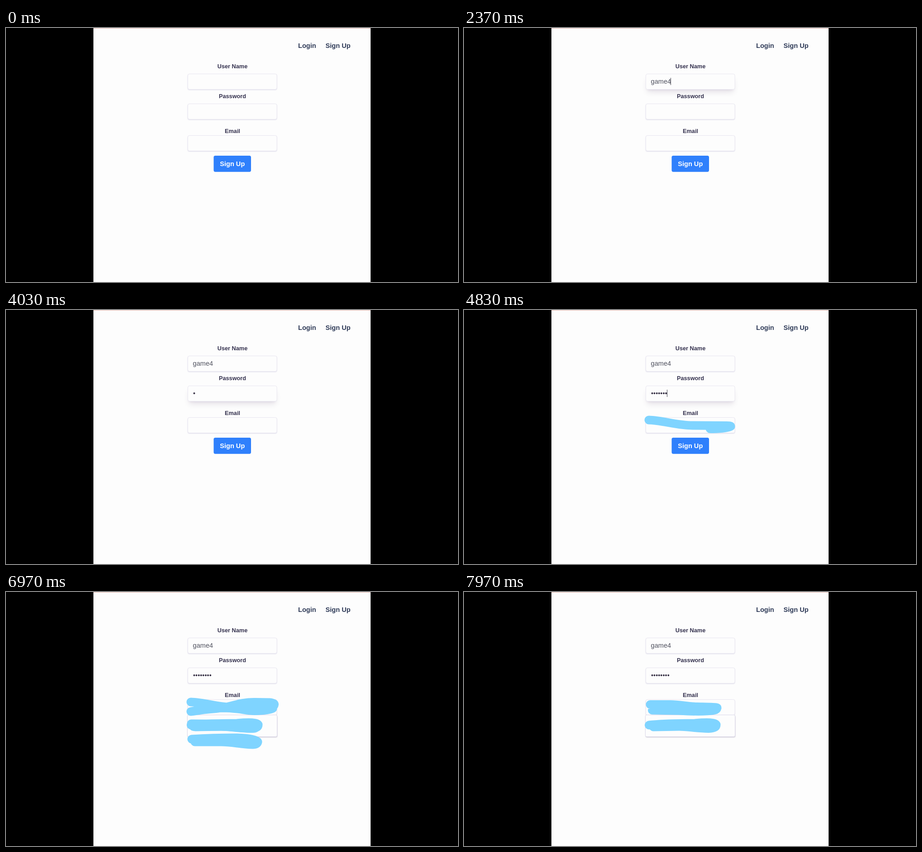
An HTML page that plays this animation: 998x561 px, repeating every 8000 ms.

```html
<!DOCTYPE html>
<html lang="en">
<head>
<meta charset="utf-8">
<title>Sign up form</title>
<style>
  html, body { margin: 0; width: 100%; height: 100%; overflow: hidden; background: #000; }
  svg { display: block; width: 998px; height: 561px; }
  text { font-family: "Liberation Sans", Arial, sans-serif; font-size: 14.56px; white-space: pre; }
  .nav { font-weight: 700; fill: #2e3a57; }
  .label { font-weight: 700; font-size: 12.74px; fill: #35324f; text-anchor: middle; }
  .value { fill: #50525f; }
  .dots { fill: #3a3448; }
  .ink { fill: none; stroke: #7fd4ff; stroke-width: 19; stroke-linecap: round; stroke-linejoin: round; }
</style>
</head>
<body>
<svg id="stage" viewBox="0 0 998 561">
  <defs>
    <filter id="blur1" x="-10%" y="-100%" width="120%" height="300%"><feGaussianBlur stdDeviation="1.1"/></filter>
    <filter id="blur3" x="-10%" y="-100%" width="120%" height="300%"><feGaussianBlur stdDeviation="2.7"/></filter>
    <filter id="blur7" x="-20%" y="-100%" width="140%" height="300%"><feGaussianBlur stdDeviation="6.5"/></filter>
  </defs>
  <rect width="998" height="561" fill="#000"/>
  <rect x="193" width="612" height="561" fill="#fdfdfd"/>
  <rect x="193" width="612" height="1" fill="#eab9b0"/>
  <text class="nav" x="645" y="44">Login</text>
  <text class="nav" x="705.6" y="44">Sign Up</text>
  <g id="fields"></g>
  <text class="label" x="500" y="89">User Name</text>
  <text class="label" x="500" y="155.3">Password</text>
  <text class="label" x="500" y="232">Email</text>
  <rect x="458.5" y="282" width="82.5" height="35.7" rx="3.6" fill="#2f80fc"/>
  <text x="499.8" y="305" fill="#fff" font-weight="700" text-anchor="middle">Sign Up</text>
  <text id="user" class="value" x="412.6" y="122.8"></text>
  <text id="pass" class="dots" x="413" y="189.2"></text>
  <rect id="caret" width="1" height="16" fill="#44444f"/>
  <g id="menu">
    <rect id="menuShadow" x="401" y="273" width="198" fill="#3c2a5c" opacity=".28" rx="3" filter="url(#blur1)"/>
    <rect id="menuBox" x="400.5" y="271.5" width="198" fill="#fdfdfd" stroke="#dcd9ea" rx="3"/>
  </g>
  <g id="inks"></g>
</svg>
<script>
const LOOP = 8000, BLINK = 333;
const NAME = "game4";
const NAME_KEYS = [1900, 1970, 2050, 2130, 2200];
const PASS_KEYS = [3690, 4100, 4180, 4260, 4350, 4720, 4800, 4880];
const USER_FOCUS = 1330, PASS_FOCUS = 3200, MAIL_FOCUS = 5050;
const MENU_OPEN = 5150, MENU_SHRINK = 5700;

const $ = id => document.getElementById(id);
const ramp = (t, from, length) => Math.min(1, Math.max(0, (t - from) / length));

function add(parent, tag, attrs) {
  const el = document.createElementNS("http://www.w3.org/2000/svg", tag);
  for (const key in attrs) el.setAttribute(key, attrs[key]);
  parent.append(el);
  return el;
}

function addField(y) {
  const group = add($("fields"), "g", {});
  const box = (inset, dy, attrs) => add(group, "rect", {
    x: 401.5 + inset, y: y + dy + inset, width: 196.5 - 2 * inset, height: 34 - 2 * inset, rx: 3.6, ...attrs
  });
  const rest = box(0, 1, { fill: "#3a2f80", opacity: 0.22, filter: "url(#blur1)" });
  const wide = box(3, 9, { fill: "#3c1e50", filter: "url(#blur7)" });
  const near = box(2, 4, { fill: "#3c1e50", filter: "url(#blur3)" });
  box(0, 0, { fill: "#fdfdfd", stroke: "#e9e7f1" });
  return focus => {
    rest.setAttribute("opacity", 0.22 * (1 - focus));
    wide.setAttribute("opacity", 0.12 * focus);
    near.setAttribute("opacity", 0.06 * focus);
  };
}

const setUser = addField(101.5);
const setPass = addField(167.5);
addField(237.5)(0);

// Marker strokes: start of drawing, start of fading, path
const strokes = [
  [4710, 7200, "M408 243C440 244 470 255 505 255L580 255.5Q589 255.5 589 257Q580 262 549 262.5C530 262 510 256 480 256C445 257 430 262 408 264C440 258 465 259 487 254C515 247 530 243 550 243.5L582 244Q592 245 592.5 248Q592 254 580 255"],
  [5000, 7450, "M409 291C432 291 455 291 475 291.5C500 292 510 294 525 294Q552 295 552.5 298Q551 301.5 545 301.5C520 301 500 297 475 297L414 297.5"],
  [5050, 7450, "M410 325C440 323 480 322 510 322Q553 324 556 331Q555 337 545 337C515 336 500 331 475 331L417 331"],
  [6600, 9000, "M408.5 294C440 290 480 290.5 510 290Q553 286 557 293Q557 301 540 301.5C510 301 495 297 475 297L418 298"],
  [7240, 9000, "M411 248.5L455 248.5C480 249 490 253 515 253.5C535 254 559 254 559 256Q558 260 553 261C535 264.5 500 263.5 475 262L415.5 261"]
].map(([start, end, d]) => {
  const path = add($("inks"), "path", { class: "ink", d });
  return { path, start, end, length: path.getTotalLength() };
});

const typed = (keys, t) => keys.filter(k => k <= t).length;

function drawCaret(t) {
  const inPass = t >= PASS_FOCUS;
  const field = inPass ? $("pass") : $("user");
  const events = [USER_FOCUS, ...NAME_KEYS, PASS_FOCUS, ...PASS_KEYS].filter(k => k <= t);
  const on = t < MAIL_FOCUS && events.length > 0 &&
    Math.floor((t - events[events.length - 1]) / BLINK) % 2 === 0;
  const width = field.textContent ? field.getComputedTextLength() : 0;
  const caret = $("caret");
  caret.setAttribute("visibility", on ? "visible" : "hidden");
  caret.setAttribute("x", Math.round(412.6 + width - 0.6));
  caret.setAttribute("y", inPass ? 176 : 110);
}

function draw(t) {
  setUser(ramp(t, USER_FOCUS, 100) - ramp(t, PASS_FOCUS, 100));
  setPass(ramp(t, PASS_FOCUS, 100) - ramp(t, MAIL_FOCUS, 100));
  $("user").textContent = NAME.slice(0, typed(NAME_KEYS, t));
  $("pass").textContent = "•".repeat(typed(PASS_KEYS, t));
  drawCaret(t);

  const height = t < MENU_SHRINK ? 81 : 48;
  $("menu").setAttribute("visibility", t >= MENU_OPEN ? "visible" : "hidden");
  $("menuBox").setAttribute("height", height);
  $("menuShadow").setAttribute("height", height);

  for (const { path, start, end, length } of strokes) {
    const drawn = length * ramp(t, start, 300);
    path.setAttribute("visibility", t > start ? "visible" : "hidden");
    path.setAttribute("stroke-dasharray", `${drawn} ${length + 20}`);
    path.setAttribute("opacity", 1 - ramp(t, end, 267));
  }
}

const origin = performance.now();
function tick() {
  draw((performance.now() - origin) % LOOP);
  requestAnimationFrame(tick);
}
tick();
</script>
</body>
</html>
```
